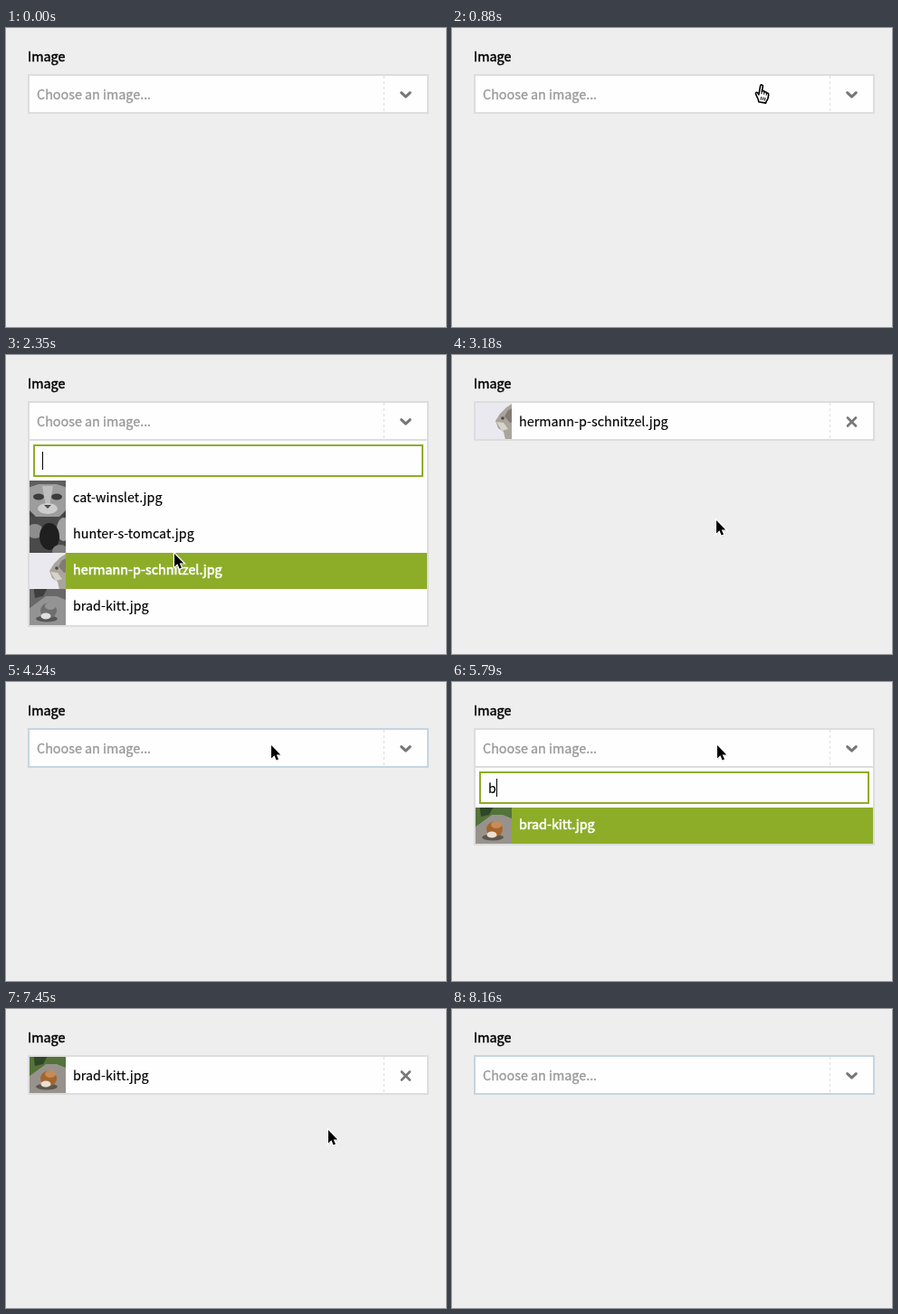
An HTML page that plays this animation: 486x331 px, repeating every 8.76 s.

```html
<!DOCTYPE html>
<html lang="en">
<head>
<meta charset="utf-8">
<title>Image picker</title>
<style>
html, body { margin: 0; width: 100%; height: 100%; overflow: hidden; background: #eee; }
svg { display: block; }
text {
  font: 400 14.33px "Noto Sans CJK JP", "Noto Sans CJK SC", "Noto Sans CJK KR", "Noto Sans CJK", "Noto Sans", sans-serif;
  fill: #000; stroke: #000; stroke-width: .15px; white-space: pre;
}
.label { font-weight: 500; stroke-width: .45px; }
.hint { fill: #999; stroke: #999; stroke-width: .35px; }
.on text { fill: #fff; stroke: #fff; stroke-width: .6px; }
.row rect { fill: none; }
.row.on rect { fill: #8dad29; }
.row use { filter: grayscale(1); }
.row.on use { filter: none; }
</style>
</head>
<body>
<svg width="486" height="331" viewBox="0 0 486 331">
  <defs>
    <filter id="soft" x="-20%" y="-20%" width="140%" height="140%"><feGaussianBlur stdDeviation=".7"/></filter>
    <symbol id="pic0" viewBox="0 0 40 40">
      <g filter="url(#soft)">
        <rect x="-5" y="-5" width="50" height="50" fill="#b59a75"/>
        <path d="M-5 -5H45V9L30 4H10L-5 9Z" fill="#5f6150"/>
        <path d="M14 6L18 28H22L26 6Z" fill="#d3bb98"/>
        <ellipse cx="10" cy="18" rx="6" ry="3.4" fill="#3f3d28"/>
        <ellipse cx="30" cy="18" rx="6" ry="3.4" fill="#3f3d28"/>
        <ellipse cx="20" cy="31" rx="11" ry="6" fill="#dccbb4"/>
        <path d="M16 27H24L20 31Z" fill="#6b4438"/>
        <path d="M-5 28L12 45H-5ZM45 28L28 45H45Z" fill="#4a4235"/>
      </g>
    </symbol>
    <symbol id="pic1" viewBox="0 0 40 40">
      <g filter="url(#soft)">
        <rect x="-5" y="-5" width="50" height="50" fill="#4a4a4a"/>
        <ellipse cx="6" cy="16" rx="9" ry="8" fill="#8d8d8d"/>
        <ellipse cx="38" cy="14" rx="8" ry="13" fill="#a2a2a2"/>
        <ellipse cx="22" cy="22" rx="11" ry="15" fill="#1f1f1f"/>
        <ellipse cx="34" cy="38" rx="9" ry="7" fill="#808080"/>
      </g>
    </symbol>
    <symbol id="pic2" viewBox="0 0 40 40">
      <g filter="url(#soft)">
        <rect x="-5" y="-5" width="50" height="50" fill="#e9e9ef"/>
        <path d="M45 -2L34 5L27 12L22 20L25 28L31 32L34 45H45Z" fill="#aaa49d"/>
        <path d="M45 4L36 8L32 15L38 22L45 20Z" fill="#817b74"/>
        <path d="M23 21L31 22L36 29L29 31Z" fill="#d8d2cd"/>
        <circle cx="30" cy="17" r="1.8" fill="#4d4a42"/>
      </g>
    </symbol>
    <symbol id="pic3" viewBox="0 0 40 40">
      <g filter="url(#soft)">
        <rect x="-5" y="-5" width="50" height="50" fill="#98928c"/>
        <path d="M-5 -5H45V14L30 8H18L-5 25Z" fill="#547339"/>
        <path d="M4 -5H22L15 8L6 10Z" fill="#2f4628"/>
        <ellipse cx="19" cy="33" rx="12" ry="3.5" fill="#5d5650"/>
        <ellipse cx="21" cy="24" rx="9" ry="8.5" fill="#a4652f"/>
        <ellipse cx="23" cy="19" rx="6" ry="4" fill="#c58c58"/>
        <ellipse cx="18" cy="30" rx="5.5" ry="3.6" fill="#eadfd2"/>
      </g>
    </symbol>
    <path id="finger" d="M-1.2 1.2C-1.2 -.5 1.6 -.5 1.6 1.2V7C1.8 5.6 4.3 5.8 4.3 7.3C4.8 6.3 7 6.6 7 8.2C7.6 7.4 9.5 7.8 9.5 9.5V13C9.5 15.5 8 16 8 19H0C0 16.5 -2.5 15 -4.6 11C-5.6 9.4 -3.4 8.2 -2.3 9.8L-1.2 11.2Z"/>
  </defs>

  <rect width="486" height="331" fill="#eee"/>
  <text class="label" x="24" y="37">Image</text>

  <g id="menu">
    <rect id="panel" x="25" y="94" width="441" fill="#fefefe" stroke="#ddd" stroke-width="2"/>
    <rect id="search" x="31" y="100" width="429" height="34" fill="#fefefe" stroke-width="2"/>
    <text id="query" x="40" y="123"></text>
    <rect id="caret" y="107" width="1" height="20"/>
    <g id="list"></g>
  </g>

  <rect id="field" x="25" y="52" width="441" height="42" fill="#fefefe" stroke-width="2"/>
  <path d="M417.5 53V93" stroke="#ddd" stroke-dasharray="3 3"/>
  <g id="empty">
    <text class="hint" x="34" y="79">Choose an image...</text>
    <path d="M436.7 71.6L441.5 76.2L446.3 71.6" fill="none" stroke="#777" stroke-width="3" stroke-linecap="round" stroke-linejoin="round"/>
  </g>
  <g id="value">
    <use id="valuePic" x="26" y="53" width="40" height="40"/>
    <text id="valueName" x="74" y="79"></text>
    <path d="M437 69.5L446 78.5M446 69.5L437 78.5" stroke="#777" stroke-width="2.6" stroke-linecap="round"/>
  </g>

  <g id="cursor">
    <g id="arrow">
      <path d="M.6 1.2V16L4 12.8L6.3 18L8.7 17L6.4 11.8H11Z" opacity=".2"/>
      <path d="M0 0V14.4L3.4 11.3L5.6 16.6L8 15.6L5.7 10.4H10.2Z" stroke="#fff" stroke-width="2.4" paint-order="stroke"/>
    </g>
    <g id="hand" transform="translate(1 0) rotate(10)" stroke-linejoin="round">
      <use href="#finger" fill="none" stroke="#fff" stroke-width="3"/>
      <use href="#finger" fill="#fff" stroke="#000" stroke-width="1.6"/>
      <path d="M1.6 7V10M4.3 7.5V10M7 8.2V10.5M2 13V16.5M4.2 13V16.5M6.3 13V16.5" stroke="#000"/>
    </g>
  </g>
</svg>
<script>
const LOOP = 8760, STEP = 57.8;
const GREEN = '#8dad29', GREY = '#ddd', BLUE = '#c5d5e1';
const ROW_TOP = 139, ROW = 40;
const names = ['cat-winslet.jpg', 'hunter-s-tomcat.jpg', 'hermann-p-schnitzel.jpg', 'brad-kitt.jpg'];
const word = 'brad', keyTimes = [5790, 5910, 5970, 6210];

// Each move eases to its goal; bend is the sideways bulge halfway
const entry = { x: 462, y: 180 };
const moves = [
  { from: 360, to: 710, x: 341, y: 63 },
  { from: 1540, to: 2700, x: 175, y: 234, bend: [-3, -6] },
  { from: 2950, to: 3640, x: 424, y: 70, bend: [0, 26] },
  { from: 3800, to: 4180, x: 293, y: 70 },
  { from: 6270, to: 6860, x: 163, y: 155 },
  { from: 7150, to: 7780, x: 423, y: 66, bend: [0, 58] },
  { from: 7980, to: 8160, x: 432, y: 112 }
];

const $ = id => document.getElementById(id);
const show = (id, on) => { $(id).style.display = on ? '' : 'none'; };
const within = (t, ...spans) => spans.some(([a, b]) => t >= a && t < b);
const ease = u => 1 - Math.pow(1 - u, 2.2);

function pointer(t) {
  const i = moves.findLastIndex(m => m.from <= t);
  if (i < 0) return entry;
  const { from, to, x, y, bend = [0, 0] } = moves[i];
  const start = i ? moves[i - 1] : entry;
  const passed = Math.floor((t - from) / STEP) * STEP;
  const p = ease(Math.min(1, passed / (to - from)));
  const bulge = 4 * p * (1 - p);
  return {
    x: start.x + (x - start.x) * p + bend[0] * bulge,
    y: start.y + (y - start.y) * p + bend[1] * bulge
  };
}

$('list').innerHTML = names.map((name, i) => `<g class="row">
  <rect x="26" y="${ROW_TOP}" width="439" height="${ROW}"/>
  <use href="#pic${i}" x="26" y="${ROW_TOP}" width="40" height="40"/>
  <text x="74" y="163">${name}</text></g>`).join('');
const rows = [...document.querySelectorAll('.row')];

function drawMenu(t, y) {
  const query = word.slice(0, keyTimes.filter(k => k <= t).length);
  const shown = rows.filter((row, i) => names[i].startsWith(query));
  const hover = Math.max(0, Math.floor((y - ROW_TOP) / ROW));
  rows.forEach(row => {
    const at = shown.indexOf(row);
    row.style.display = at < 0 ? 'none' : '';
    row.setAttribute('transform', `translate(0 ${at * ROW})`);
    row.classList.toggle('on', at === hover);
  });
  $('panel').setAttribute('height', 46 + shown.length * ROW);
  const blurred = within(t, [2710, 2770], [4360, 4400], [6900, 6970]);
  $('search').setAttribute('stroke', blurred ? GREY : GREEN);
  $('query').textContent = query;
  const width = query ? $('query').getComputedTextLength() : 0;
  $('caret').setAttribute('x', Math.round(40 + width));
  show('caret', !blurred && !within(t, [1780, 2260], [4950, 5430]));
}

function draw(t) {
  const { x, y } = pointer(t);
  const open = within(t, [1240, 2770], [4360, 6970]);
  const picked = within(t, [2770, 3760]) ? 2 : within(t, [6970, 7980]) ? 3 : -1;
  show('menu', open);
  if (open) drawMenu(t, y);

  const focus = within(t, [3760, 4360], [7980, LOOP]);
  $('field').setAttribute('stroke', focus ? BLUE : GREY);
  show('empty', picked < 0);
  show('value', picked >= 0);
  if (picked >= 0) {
    $('valuePic').setAttribute('href', '#pic' + picked);
    $('valueName').textContent = names[picked];
  }

  const hand = within(t, [650, 2000]);
  show('cursor', within(t, [360, 5910], [6270, 8160]));
  show('hand', hand);
  show('arrow', !hand);
  $('cursor').setAttribute('transform', `translate(${Math.round(x)} ${Math.round(y)})`);
}

const begin = performance.now();
function tick() {
  draw((performance.now() - begin) % LOOP);
  requestAnimationFrame(tick);
}
draw(0);
requestAnimationFrame(tick);
</script>
</body>
</html>
```
